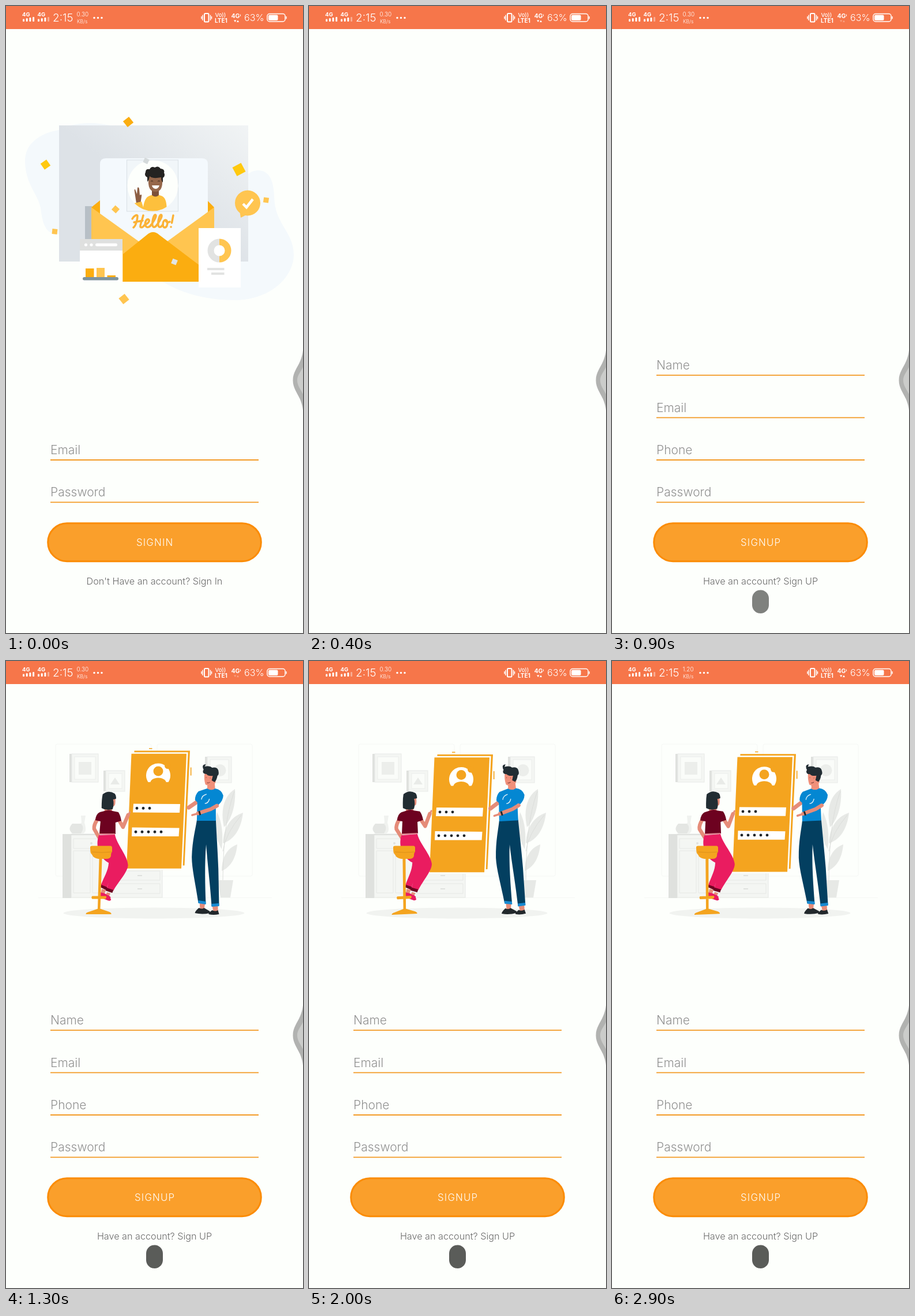
An HTML page that plays this animation: 515 by 1087 pixels, repeating every 3.3 s.

```html
<!DOCTYPE html>
<html lang="en">
<head>
<meta charset="utf-8">
<title>Sign in to sign up</title>
<style>
html, body { margin: 0; width: 100%; height: 100%; overflow: hidden; background: #fdfffc; }
svg { display: block; width: 100%; height: 100%; }
text { font-family: Inter, Roboto, sans-serif; font-weight: 300; }
.hint { font-size: 21px; fill: #929292; }
.foot { font-size: 16.2px; fill: #6a6a6a; text-anchor: middle; }
.btn { font-size: 16.8px; fill: #fff; text-anchor: middle; letter-spacing: 1.2px; }
.bar text { fill: #fff; }
.bar .b { font-weight: 700; }
</style>
</head>
<body>
<svg viewBox="0 0 515 1087">
  <defs>
    <linearGradient id="wall" x1="0.45" y1="0.5" x2="1" y2="0">
      <stop offset="0" stop-color="#dde2e7"/><stop offset="1" stop-color="#f1f4f5"/>
    </linearGradient>
    <clipPath id="disc"><circle cx="254.5" cy="311.5" r="44"/></clipPath>
  </defs>
  <rect width="515" height="1087" fill="#fdfffc"/>

  <g id="login">
    <path fill="#f4f9fc" d="M92 215C58 220 32 240 33 270C34 310 55 325 60 350C63 375 68 398 92 395L275 480C310 500 350 510 400 510C460 508 498 470 499 432C499 390 466 380 465 330C464 300 455 285 437 285C428 285 420 290 418 294L400 208L180 207C150 200 115 202 92 215Z"/>
    <rect x="92" y="207" width="328" height="236" fill="url(#wall)"/>
    <rect x="137" y="347" width="12" height="58" fill="#b7bfc6"/>
    <path fill="#fbad10" d="M148 349L163 337V365ZM361 349L350 338V365Z"/>
    <path fill="#f4f9fd" d="M163 440V274Q163 264 173 264H340Q350 264 350 274V440Z"/>
    <path fill="#ffc550" d="M148 349L255 426L361 349V478H148Z"/>
    <path fill="#fbad10" d="M203 478V430L244 397Q255 387 266 397L336 450V478Z"/>
    <rect x="209.5" y="267" width="89" height="89" fill="#f1f6f9" stroke="#d9e0e5"/>
    <circle cx="254.5" cy="311.5" r="44" fill="#fdfffc"/>
    <g clip-path="url(#disc)">
      <path fill="#8d5e42" d="M226 342L223 322Q222 317 224 318L227 326L228 315Q230 313 231 317L232 328Q236 325 235 330L233 344Z"/>
      <path fill="#fdc03d" d="M222 342L235 339L238 349C241 331 246 330 252 328H266C275 330 279 335 279 357H232Q223 357 222 342Z"/>
      <path fill="#7d5139" d="M253 316H265V328Q259 333 253 328Z"/>
      <path fill="#95674b" d="M247 292H271V308Q270 322 259 322Q248 322 247 308Z"/>
      <path fill="#242321" d="M245 305V297Q239 294 242 288Q242 282 249 283Q252 277 258 280Q264 276 268 282Q276 283 274 289Q277 295 272 298V306Q269 303 269 297Q254 300 249 295Q248 302 245 305Z"/>
      <path fill="none" stroke="#3a271e" d="M251 304q2-2 4 0M263 304q2-2 4 0"/>
      <path fill="#fff" d="M253 311H266Q264 317 259 317Q254 316 253 311Z"/>
    </g>
    <g fill="none" stroke="#fbb236" stroke-width="3.5" stroke-linecap="round" stroke-linejoin="round">
      <path d="M219 369C222 363 228 361 228 364C228 371 225 381 221 384M238 363C236 372 232 380 233 383C235 385 238 383 240 380M222 375L237 372"/>
      <path d="M240 380C247 377 250 372 247 370C243 369 240 376 242 381C244 385 249 384 252 379"/>
      <path id="ell" d="M252 379C258 371 262 363 259 362C256 361 253 374 254 380C255 385 259 384 262 379"/>
      <use href="#ell" x="10"/>
      <path d="M277 371C272 370 270 383 275 384C280 384 282 372 277 371C277 375 281 376 284 374M290 363L287.5 376M286 383h.1"/>
    </g>
    <path fill="#fff" d="M128 404H202V478H128Z"/>
    <path fill="#dfe0df" d="M128 404H202V424H128Z"/>
    <g fill="#fff"><circle cx="138.5" cy="414" r="2.6"/><circle cx="148" cy="414" r="2.6"/><rect x="155" y="411.5" width="38" height="5" rx="2.5"/></g>
    <path fill="#fbad10" d="M138 455H152.5V471H138ZM175.5 467H190V471H175.5Z"/>
    <path fill="#ffc550" d="M157 454H171V471H157Z"/>
    <rect x="133" y="470" width="62" height="5.5" rx="2.7" fill="#7f949e"/>
    <path fill="#fff" d="M334 385H407V488H334Z"/>
    <g fill="none" stroke-width="11"><path stroke="#e2e3e2" d="M370 409A15 15 0 0 0 370 439"/><path stroke="#ffc550" d="M370 409A15 15 0 0 1 370 439"/></g>
    <path fill="none" stroke="#e2e3e2" stroke-width="3.8" d="M349 456H378.5M356 464H378.5"/>
    <path fill="#ffc550" d="M405 355L407 367L419 361Z"/>
    <circle cx="419" cy="341.5" r="22" fill="#ffc550"/>
    <path d="M411 343L417 349L428 335" fill="none" stroke="#fff" stroke-width="4.5"/>
    <g id="confetti"></g>
    <g id="loginForm"></g>
  </g>

  <g id="signup">
    <g id="scene">
      <g fill="none" stroke="#f5f7f4">
        <rect x="86" y="144" width="166" height="229" rx="3"/><rect x="262" y="144" width="165" height="229" rx="3"/>
        <path d="M56 410.5H461"/>
      </g>
      <ellipse cx="256.5" cy="437" rx="157" ry="9.5" fill="#f1f3f0"/>
      <g id="frames"></g>
      <path fill="#e9ebe8" d="M181 214L189 202L197 214Z"/>
      <rect x="126" y="175" width="22" height="22" fill="#eceeeb"/>
      <circle cx="371" cy="189.5" r="10.5" fill="#eceeeb"/>
      <path fill="#f0f2ef" d="M130 268H138L136 280Q141 296 134 299H127Q122 292 131 280Z"/>
      <path fill="#e4e6e3" d="M115 282H130Q137 289 130 299H115Q106 291 115 282Z"/>
      <g fill="#f4f6f3" stroke="#e6e8e5">
        <rect x="113" y="300" width="70" height="110"/><rect x="180" y="358" width="91" height="52"/>
        <path d="M117 308H179V325H117ZM117 329H146V402H117ZM150 329H179V402H150ZM187 364H267V380H187ZM187 386H267V403H187Z"/>
      </g>
      <path fill="#dfe1de" d="M98 300H113V411H98ZM109 300H184V302H109ZM228 371H236V373H228ZM228 394H236V396H228Z"/>
      <circle cx="148" cy="316" r="2" fill="#dfe1de"/>
      <g fill="#e7e9e6">
        <path d="M397 222C376 235 372 262 378 288C391 275 399 250 397 222Z"/>
        <path d="M411 263C389 270 377 290 376 316C396 310 408 290 411 263Z"/>
        <path d="M401 318C384 324 374 340 374 364C390 357 399 341 401 318Z"/>
        <path d="M366 262C360 285 364 310 374 326C377 303 375 280 366 262Z"/>
        <path d="M367 380H394L389 410H372Z"/>
      </g>
      <path d="M396 226C380 270 377 320 376 380M408 267Q380 300 376 330" fill="none" stroke="#dcdedb"/>

      <g id="card">
        <path fill="#f4a41f" d="M222.5 155H319L309.500 354H213ZM248 150.500H253.500V152H248ZM319.800 184H321.500V198H319.800Z"/>
        <path fill="#f4a41f" stroke="#fdfffc" stroke-width="5" paint-order="stroke" d="M217.500 160.200H313L304 359.200H209Z"/>
        <path fill="#fff" d="M246.500 209.500A21 21 0 1 1 281.500 209.500Z"/>
        <path fill="#f4a41f" d="M250 210.500C252 199 276 199 278 210.500Z"/>
        <circle cx="264" cy="190.5" r="10.5" fill="#fff"/><circle cx="264" cy="190.5" r="8.5" fill="#f4a41f"/>
        <circle cx="280.5" cy="181" r="5.5" fill="#f4a41f"/>
        <path fill="#fff" d="M221 247L302 247.500L301 262.500L220 262ZM218.500 288L300.500 289L299.500 303.500L218 303.500Z"/>
        <g id="dots" fill="#20262b"></g>
      </g>

      <g id="woman">
        <path fill="none" stroke="#e58c79" stroke-width="6.5" stroke-linecap="round" stroke-linejoin="round" d="M159 274Q152 284 153 291L161 305M196 276L203 288L212 267"/>
        <path d="M211 270L215 262" stroke="#e58c79" stroke-width="3" stroke-linecap="round"/>
        <path fill="#e58c79" d="M171 248H184V264H171ZM180 232H189Q191 244 189 250Q186 254 180 251Z"/>
        <path fill="#ea1c60" d="M161 302L189 301C192 318 211 338 211.500 354C211 366 196 381 186 398L174 395L178 384L174 394L164 389C170 374 177 364 178 350C163 342 154 322 161 302Z"/>
        <path fill="#6d0220" d="M171 260Q178 257 185 260L195 262Q199 268 200 277L190 280V300H162L164 278L155 276Q156 265 163 262ZM165 388L175 392L173 397L163 392ZM174 393L186 397L184 402L172 398Z"/>
        <path stroke="#e0818d" stroke-width="2" d="M162 300H189"/>
        <path fill="#e58c79" d="M166 395L173 397L170 405L164 403ZM175 401L181 403L178 408L172 406Z"/>
        <path fill="#ea1c60" d="M163 401L171 403L181 409Q182 412 177 411L160 409ZM169 404L179 407L182 414Q180 417 176 415L166 411Z"/>
        <path fill="#222d33" d="M168 231Q178 223 189 230Q192 234 191 239L186 240Q188 249 185 257Q174 260 166 255Q166 240 168 231Z"/>
        <path fill="#f4a41f" d="M161.500 342H166.500L163 432H158.500ZM149 407.500H173Q175 410 172 412.500H149Q147 410 149 407.500ZM159 429.500H163L179 435Q183 437 182 439H138Q138 436 143 435Z"/>
      </g>
      <path fill="#f4a41f" d="M149 320.500H181Q184 320.500 184 324V331Q182 332 182 338Q181 343 174 343H160Q151 341 150 337L147 333Q146 330 146 323Q146 320.500 149 320.500Z"/>
      <path d="M149 331Q165 333 184 331" fill="none" stroke="#dc9019"/>

      <g id="man">
        <path fill="#e58c79" d="M335 416L345 419L343 430L336 430ZM357 424H367V434H359Z"/>
        <path fill="#22282c" d="M334 428Q339 431 343 428L353 434V437Q340 440 327 437Q327 434 334 428ZM357 432Q362 435 367 432L369 439Q359 441 351 439Q350 437 357 432Z"/>
        <path fill="#033f60" d="M331 276H364C365 300 367 330 368 360L369 424L356 425C354 390 349 350 347 318C344 350 345 390 346 421L333 419C328 385 322 360 322 340C323 310 329 290 331 276Z"/>
        <path fill="#168ad2" d="M333 415L346 417V422L333 420ZM356 421L369 420V425L356 426Z"/>
        <path fill="none" stroke="#e58c79" stroke-width="7" stroke-linecap="round" d="M333 243L317 254"/>
        <path fill="#f0907a" d="M350 211L362 209L363 222Q356 228 349 222ZM345 194Q351 188 363 192L364 210Q360 218 352 217L346 214Q343 203 345 194Z"/>
        <path fill="#0487d2" d="M334 226L349 221Q356 226 363 221Q374 223 377 233Q377 242 368 250L364 248V277H331L332 245L328 241Q328 232 334 226Z"/>
        <path fill="none" stroke="#e58c79" stroke-width="6.5" stroke-linecap="round" stroke-linejoin="round" d="M366 251L355 257L333 264"/>
        <path d="M334 264L323 267" stroke="#e58c79" stroke-width="3.5" stroke-linecap="round"/>
        <path d="M335 260L337 267" stroke="#22282c" stroke-width="3"/>
        <path d="M348 231Q340 233 339 240M353 239Q351 247 345 247" fill="none" stroke="#e1f1f8" stroke-width="1.4"/>
        <path fill="#222d33" d="M342 186Q340 179 347 179L345 183Q354 181 358 185Q368 183 369 192Q370 197 367 199Q366 206 362 210L357 207L359 199Q351 200 348 196Q341 196 342 190Q344 189 342 186Z"/>
        <path d="M347 202h1M354 203h1M349 211q3 1 5-1" fill="none" stroke="#7b3831"/>
      </g>
    </g>
    <g id="signupForm"></g>
    <rect id="pill" x="243" y="1012.5" width="29" height="40.5" rx="14.5" fill="#5a5c59"/>
  </g>

  <path fill="#b1b2b0" d="M515 597C512 623 497.500 630 497.500 649C497.500 668 512 675 515 701Z"/>
  <path fill="#cbccca" d="M515 626C510 636 505 640 505 649C505 658 510 663 515 673Z"/>

  <g class="bar">
    <rect width="515" height="40" fill="#f6764a"/>
    <text class="b" x="28" y="18" font-size="9.5">4G</text>
    <text class="b" x="54.5" y="18" font-size="9.5">4G</text>
    <g id="signal" fill="#fff"></g>
    <text x="81" y="27" font-size="19">2:15</text>
    <text id="speed" x="122.5" y="18" font-size="10"></text>
    <text x="123" y="30" font-size="8.5">KB/s</text>
    <g fill="#fff"><circle cx="153" cy="20.5" r="1.7"/><circle cx="159.5" cy="20.5" r="1.7"/><circle cx="166" cy="20.5" r="1.7"/></g>
    <g fill="none" stroke="#fff" stroke-width="1.5">
      <rect x="344" y="13" width="7.5" height="14.5" rx="1.5" stroke-width="2"/>
      <path d="M341 15.500V25M339 18V22.500M354.500 15.500V25M356.500 18V22.500"/>
      <rect x="453" y="13.5" width="31" height="13.5" rx="4"/><path d="M486 18V22.500"/>
    </g>
    <rect x="455" y="15.5" width="16.5" height="9.5" rx="2" fill="#fff"/>
    <text x="362.5" y="19" font-size="9.5" style="font-weight:500">Vo))</text>
    <text class="b" x="362" y="29" font-size="10">LTE1</text>
    <text class="b" x="390.5" y="21" font-size="10.5">4G</text>
    <path d="M406.500 14.500V18" stroke="#fff"/>
    <path id="arrows" fill="#fff" d="M395 24.500H399.500L397.200 28ZM399.800 28H404L402 24.500Z"/>
    <text x="413" y="26" font-size="16.2">63%</text>
  </g>
</svg>
<script>
const $ = id => document.getElementById(id);
const LOOP = 3300, STEP = 100, ROW = 73.4;
const clamp = v => Math.max(0, Math.min(1, v));
const ramp = (t, a, b) => clamp((t - a) / (b - a));

function form(id, fields, label, foot) {
  const top = 850.4 - ROW * (fields.length - 1);
  const rows = fields.map((name, i) => {
    const y = top + ROW * i;
    return `<text class="hint" x="77" y="${y}">${name}</text>
      <path d="M77 ${y + 10}H438" stroke="#f39a25" stroke-width="1.8"/>`;
  });
  $(id).innerHTML = rows.join('') +
    `<rect x="72.7" y="896.7" width="369.6" height="66" rx="33" fill="#fa9f2b" stroke="#fb8c05" stroke-width="3"/>
     <text class="btn" x="258.2" y="936.4">${label}</text>
     <text class="foot" x="257.5" y="1003">${foot}</text>`;
}
form('loginForm', ['Email', 'Password'], 'SIGNIN', "Don't Have an account? Sign In");
form('signupForm', ['Name', 'Email', 'Phone', 'Password'], 'SIGNUP', 'Have an account? Sign UP');

// x, y, size, angle, colour
$('confetti').innerHTML = [
  [212, 201, 13, -38, '#fbad10'], [68.5, 275, 12.5, -35, '#ffc90f'], [404, 283.5, 17, -28, '#ffc90f'],
  [84.5, 391, 9, 6, '#ffc550'], [190, 352.5, 10, 42, '#ffc550'], [243, 268.5, 8.5, 25, '#d5dadb'],
  [292, 443.5, 9, 22, '#e2e5e4'], [204.5, 508, 13, -38, '#ffc550'], [451, 336.5, 9, 8, '#ffc550']
].map(([x, y, s, a, c]) =>
  `<rect x="${-s / 2}" y="${-s / 2}" width="${s}" height="${s}" fill="${c}" transform="translate(${x} ${y}) rotate(${a})"/>`).join('');

$('frames').innerHTML = [[110, 161, 50], [169, 190, 37], [345, 166, 46]].map(([x, y, s]) =>
  `<rect x="${x}" y="${y}" width="4" height="${s - 1}" fill="#dfe1de"/>
   <rect x="${x + 4}" y="${y}" width="${s - 4}" height="${s - 1}" fill="#f4f6f3" stroke="#e8eae7"/>
   <rect x="${x + 9}" y="${y + 5}" width="${s - 14}" height="${s - 11}" fill="#fafcf9" stroke="#eceeeb"/>`).join('');

const dotRow = (n, x, y) => Array.from({ length: n }, (_, i) =>
  `<circle cx="${x + 11 * i}" cy="${y}" r="2.4"/>`).join('');
$('dots').innerHTML = dotRow(3, 227, 254.7) + dotRow(5, 225, 295.7);

$('signal').innerHTML = [29, 55].map((x, n) => [0, 1, 2, 3].map(i =>
  `<rect x="${x + 5.7 * i}" y="${22.5 - 1.2 * i}" width="3" height="${4.5 + 1.2 * i}" rx="1" opacity="${n && i === 3 ? 0.4 : 1}"/>`).join('')).join('');

function draw(t) {
  $('login').setAttribute('opacity', 1 - ramp(t, 0, 400));
  $('signup').setAttribute('opacity', ramp(t, 400, 700));
  $('pill').setAttribute('opacity', ramp(t, 500, 1020));
  $('scene').setAttribute('visibility', t >= 1100 ? 'visible' : 'hidden');
  // The card sinks and rises while both people lean with it.
  const p = 1 - 0.8e-6 * (t - 2380) ** 2;
  $('card').setAttribute('transform', `translate(0 ${8 * p})`);
  $('woman').setAttribute('transform', `rotate(${-3 * p} 165 322)`);
  $('man').setAttribute('transform', `rotate(${-3.3 * p} 350 300)`);
  $('arrows').setAttribute('opacity', t >= 600 && t < 1500 ? 0.3 : 1);
  $('speed').textContent = t >= 2800 ? '1.20' : '0.30';
}

const start = performance.now();
function tick(now) {
  const t = Math.max(0, now - start) % LOOP;
  draw(Math.floor(t / STEP) * STEP);
  requestAnimationFrame(tick);
}
draw(0);
requestAnimationFrame(tick);
</script>
</body>
</html>
```
